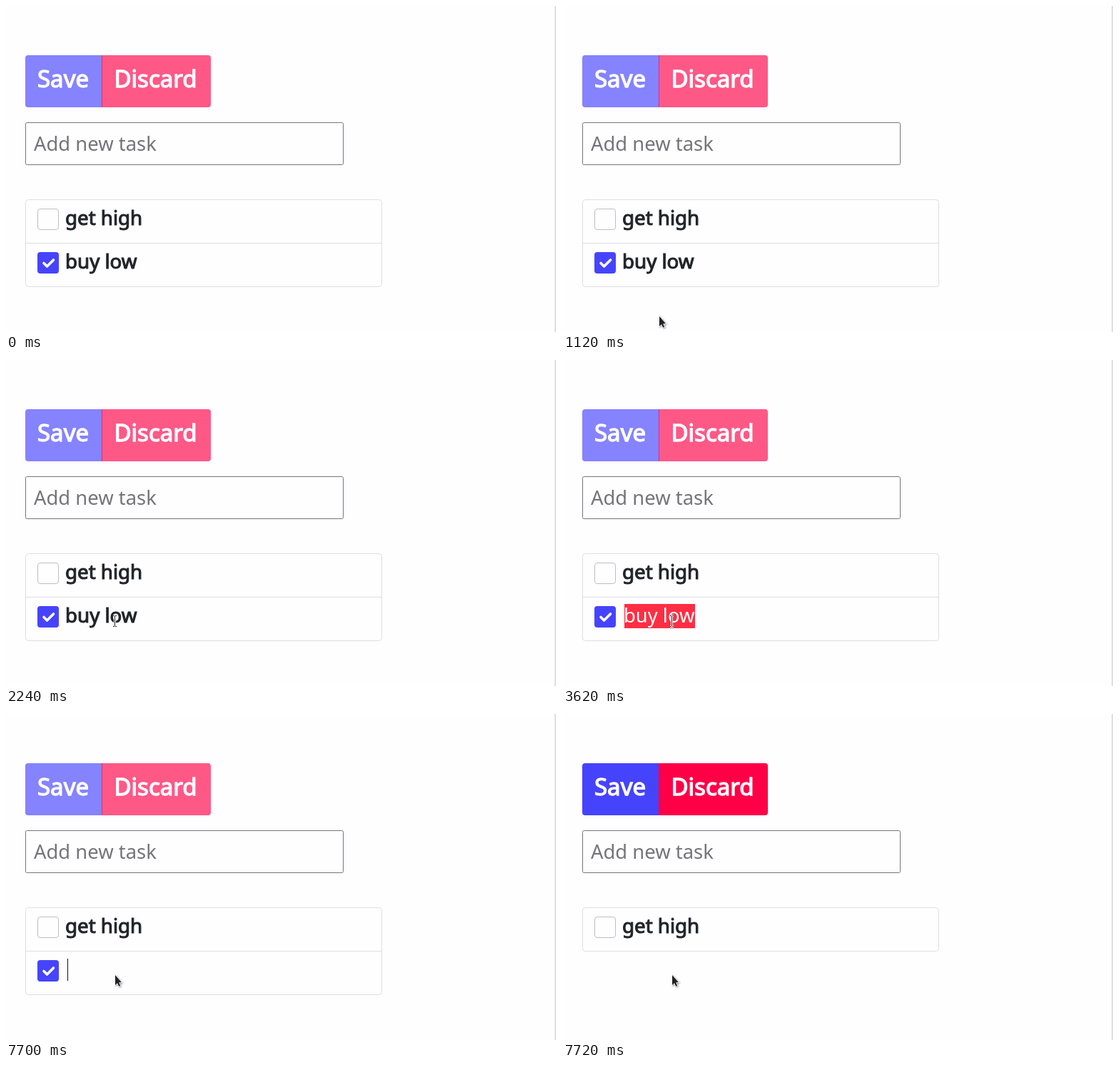
Write an HTML page that moves like this. It is 772x457 px and loops after 8 s.

```html
<!DOCTYPE html>
<html lang="en">
<head>
<meta charset="utf-8">
<style>
html, body { margin: 0; width: 100%; height: 100%; overflow: hidden; background: #fefdff; }
svg { display: block; font-family: "Noto Sans", "Open Sans", sans-serif; font-size: 27.4px; }
/* A thin stroke stands in for the medium weight */
.button { fill: #fff; stroke: #fff; stroke-width: 1.3; font-size: 33px; }
.task { fill: #212529; stroke: #212529; stroke-width: 1.1; font-size: 27.7px; }
.line { fill: none; stroke: #dfdee0; }
.box { fill: #fefdff; stroke: #bfbfc1; }
#arrow { filter: drop-shadow(1px 1px 1px #0006); }
</style>
</head>
<body>
<svg width="772" height="457" viewBox="0 0 772 457">
  <path d="M769.5 0V457" stroke="#c6c5c7"/>

  <path id="save" fill="#4643fc" d="M135 69H31a4 4 0 0 0-4 4V138a4 4 0 0 0 4 4H135z"/>
  <path id="discard" fill="#ff0047" d="M134 69H283a4 4 0 0 1 4 4V138a4 4 0 0 1-4 4H134z"/>
  <text class="button" x="44" y="114">Save</text>
  <text class="button" x="151.5" y="114">Discard</text>

  <rect x="27.5" y="163.5" width="445" height="59" rx="2" fill="#fefdff" stroke="#767578"/>
  <text x="39" y="203" fill="#757477">Add new task</text>

  <rect id="list" class="line" x="27.5" y="271.5" width="499" height="122" rx="4"/>
  <rect class="box" x="44.5" y="284.5" width="29" height="29" rx="3.5"/>
  <text class="task" x="83" y="307">get high</text>

  <g id="second">
    <path class="line" d="M28 332.5H526"/>
    <rect x="44" y="345" width="30" height="30" rx="4" fill="#4643fc"/>
    <path d="M53 360.5l4.5 4.5l9-9" fill="none" stroke="#fff" stroke-width="3.6" stroke-linecap="round" stroke-linejoin="round"/>
    <text id="label" class="task" x="83" y="368">buy low</text>
    <g id="selected">
      <rect x="86" y="342" width="99" height="34" fill="#ff2e43"/>
      <text x="85" y="368" fill="#fff">buy low</text>
    </g>
    <path id="caret" d="M86.5 343V374" stroke="#111"/>
  </g>

  <path id="arrow" d="M1 1V15L4 12.2L6.2 16.8L8.2 15.9L6.2 11.3H10z" fill="#222" stroke="#fff" stroke-width="1.4" paint-order="stroke"/>
  <g id="beam" fill="none">
    <path d="M150 358.5h5M150 373.5h5M152.5 358V374" stroke="#fff" stroke-width="3"/>
    <path d="M150 358.5h2M153 358.5h2M150 373.5h2M153 373.5h2M152.5 359V373" stroke="#222"/>
  </g>
</svg>
<script>
const $ = id => document.getElementById(id);
const show = (id, on) => $(id).style.display = on ? "" : "none";

// Pointer: time, x, y
const stops = [[1120, 134, 434], [1420, 152, 400], [1680, 185, 379], [1960, 184, 371], [7700, 152, 365]];

function draw(now) {
  const t = now % 8000;
  const pending = t < 7720;
  const editing = t >= 3620;
  const beam = t >= 2240 && t < 7700;
  const stop = stops.findLast(s => t >= s[0]);

  for (const id of ["save", "discard"]) $(id).style.opacity = pending ? 0.65 : 1;
  $("list").setAttribute("height", pending ? 122 : 61);
  show("second", pending);
  show("label", !editing);
  show("selected", editing && t < 6580);
  show("caret", t >= 6580);
  show("beam", beam);
  show("arrow", stop && !beam);
  if (stop) $("arrow").setAttribute("transform", `translate(${stop[1]} ${stop[2]})`);
  requestAnimationFrame(draw);
}
requestAnimationFrame(draw);
</script>
</body>
</html>
```
